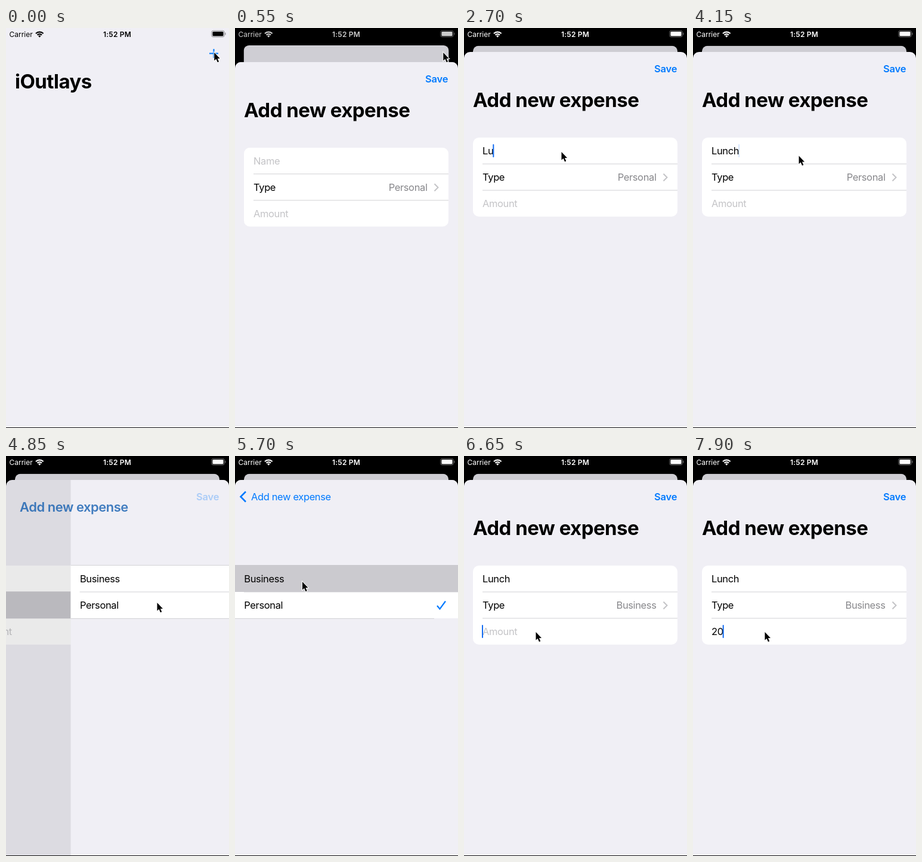
These frames come from a looping animation (374 px wide and 668 px high, 8 s). An HTML page with a canvas:

```html
<!DOCTYPE html>
<html lang="en">
<head>
<meta charset="utf-8">
<title>Expense form</title>
<style>
  html, body { margin: 0; width: 100%; height: 100%; overflow: hidden; background: #000; }
  canvas { display: block; width: 374px; height: 668px; }
</style>
</head>
<body>
<canvas id="stage"></canvas>
<script>
const W = 374, H = 668, LOOP = 8000;
const BLUE = '#007aff', PAGE = '#f0eff5', LINE = '#d2d2d5', FAINT = '#c4c4c7', GREY = '#88888c', PRESSED = '#cbcacf';
const TEXT_TRACKING = -0.023, TITLE_TRACKING = -0.016;
const canvas = document.getElementById('stage');
const ctx = canvas.getContext('2d');
const ratio = window.devicePixelRatio || 1;
canvas.width = W * ratio;
canvas.height = H * ratio;

const clamp = v => Math.max(0, Math.min(1, v));
const lerp = (a, b, k) => a + (b - a) * k;
const ramp = (t, from, to) => clamp((t - from) / (to - from));
const smooth = k => k * k * (3 - 2 * k);

// Remaining distance of a critically damped spring, 1 falling to 0
const spring = ms => {
  const x = Math.max(0, ms) * 0.0142;
  return (1 + x) * Math.exp(-x);
};

// [time, x, y] of the pointer tip
const POINTER = [
  [0, 349.3, 41], [600, 349.3, 41], [1000, 193, 186], [1150, 187, 216], [1300, 158, 208], [1450, 163.5, 207],
  [3900, 163.5, 207], [4100, 174, 212], [4500, 253.5, 245], [4900, 253.5, 245], [5500, 113, 210],
  [5800, 113, 210], [6000, 118.5, 247], [6400, 120.5, 294], [LOOP, 120.5, 294]
];

const NAME_KEYS = [2550, 2700, 3050, 3150, 3300];
const AMOUNT_KEYS = [7450, 7600];
const typed = (text, keys, t) => text.slice(0, keys.filter(key => t >= key).length);

function caretAlpha(t, starts) {
  const start = starts.filter(s => t >= s).pop();
  if (start === undefined) return 0;
  const phase = (t - start) % 1000;
  return 1 - ramp(phase, 420, 550) + ramp(phase, 680, 800);
}

// 0 on the form, 1 on the picker
function pushAt(t, lag = 0) {
  if (t >= 5850) return spring(t - lag - 5756);
  return t >= 4750 ? 1 - spring(t - lag - 4676) : 0;
}

function withState(draw) {
  ctx.save();
  draw();
  ctx.restore();
}

function rect(x, y, w, h, color) {
  ctx.fillStyle = color;
  ctx.fillRect(x, y, w, h);
}

function roundedPath(x, y, w, h, r) {
  ctx.beginPath();
  ctx.roundRect(x, y, w, h, r);
}

function polyline(points, color, width) {
  ctx.beginPath();
  points.forEach(([x, y]) => ctx.lineTo(x, y));
  ctx.strokeStyle = color;
  ctx.lineWidth = width;
  ctx.stroke();
}

function label(text, x, y, { size = 16.5, weight = 400, color = '#000', align = 'left', tracking = TEXT_TRACKING } = {}) {
  ctx.font = `${weight} ${size}px Inter, Roboto, sans-serif`;
  ctx.letterSpacing = `${size * tracking}px`;
  ctx.textAlign = align;
  ctx.fillStyle = color;
  ctx.fillText(text, x, y);
  return ctx.measureText(text).width;
}

function home(t) {
  rect(0, 0, W, H, PAGE);
  label('iOutlays', 15, 101, { size: 33, weight: 700, tracking: TITLE_TRACKING });
  withState(() => {
    ctx.globalAlpha = t >= 50 && t < 400 ? 0.3 : 1;
    polyline([[341, 42.5], [356, 42.5]], BLUE, 2);
    polyline([[348.5, 35], [348.5, 50]], BLUE, 2);
  });
}

function field(text, placeholder, baseline, caret) {
  const width = text ? label(text, 31, baseline) : 0;
  if (!text) label(placeholder, 31, baseline, { color: FAINT });
  withState(() => {
    ctx.globalAlpha = caret;
    ctx.fillStyle = '#126bf2';
    roundedPath(30 + width, baseline - 17, 2, 22, 1);
    ctx.fill();
  });
}

function form(t, highlight) {
  rect(-W, 40, W * 3, H, PAGE);
  withState(() => {
    roundedPath(15, 183, 343, 132, 10);
    ctx.clip();
    rect(15, 183, 343, 132, '#fff');
    rect(31, 226.5, 327, 1, LINE);
    rect(31, 270.5, 327, 1, LINE);
    ctx.globalAlpha = highlight;
    rect(15, 226.5, 343, 44.5, PRESSED);
  });
  const nameCaret = t < 6450 ? caretAlpha(t, [1600, ...NAME_KEYS, 3450, 5850]) : 0;
  field(typed('Lunch', NAME_KEYS, t), 'Name', 211, nameCaret);
  field(typed('20', AMOUNT_KEYS, t), 'Amount', 299, caretAlpha(t, [6650, ...AMOUNT_KEYS]));
  label('Type', 31, 255);
  label(t < 5850 ? 'Personal' : 'Business', 322.5, 255, { color: GREY, align: 'right' });
  polyline([[334.5, 243.5], [340.5, 249.5], [334.5, 255.5]], FAINT, 2);
}

function picker(t) {
  rect(0, 40, W, H, PAGE);
  rect(0, 182, W, 89, '#fff');
  rect(0, 182, W, 1, LINE);
  rect(15, 226.5, W, 1, LINE);
  rect(0, 271, 334, 1, LINE);
  if (t >= 5600 && t < 5900) rect(0, 182, W, 45, PRESSED);
  label('Business', 15.3, 211);
  label('Personal', 15.3, 255);
  polyline([[339, 250], [343.5, 255.5], [353, 242.5]], BLUE, 2.2);
}

function navigation(push, titlePush) {
  const shade = `rgba(0, ${122 * titlePush}, ${255 * titlePush}, ${1 - 1.2 * titlePush * (1 - titlePush)})`;
  label('Add new expense', lerp(15, 27, titlePush), lerp(132, 74, titlePush), {
    size: lerp(33, 16.5, titlePush),
    weight: Math.round(7 - 3 * titlePush ** 3) * 100,
    tracking: lerp(TITLE_TRACKING, TEXT_TRACKING, titlePush),
    color: shade
  });
  withState(() => {
    ctx.globalAlpha = 1 - push;
    label('Save', 357.3, 74, { weight: 600, color: BLUE, align: 'right', tracking: -0.01 });
    ctx.globalAlpha = ramp(push, 0.75, 1);
    polyline([[18, 59.5], [9.5, 68], [18, 76.5]], BLUE, 2.6);
  });
}

function sheet(t, drop) {
  const push = pushAt(t);
  const highlight = t < 4600 ? 0 : t < 5850 ? 1 : clamp(push * 1.4);

  ctx.translate(0, drop);
  roundedPath(0, 40, W, H, [10, 10, 0, 0]);
  ctx.clip();
  withState(() => {
    ctx.translate(-112 * push, 0);
    form(t, highlight);
  });
  if (push > 0) {
    rect(0, 40, W, H, `rgba(0, 0, 0, ${0.115 * push})`);
    withState(() => {
      ctx.translate(W * (1 - push), 0);
      picker(t);
    });
  }
  navigation(push, pushAt(t, 13));
}

function statusBar(t) {
  const tone = Math.round(255 * ramp(t, 200, 640));
  const color = `rgb(${tone}, ${tone}, ${tone})`;
  label('Carrier', 5.5, 14.5, { size: 12, color, tracking: 0 });
  label('1:52 PM', 186.5, 14.5, { size: 12, weight: 600, color, align: 'center', tracking: 0.015 });

  ctx.strokeStyle = ctx.fillStyle = color;
  ctx.lineWidth = 2.2;
  const from = -Math.PI * 0.75, to = -Math.PI * 0.25;
  for (const radius of [5.3, 8.9]) {
    ctx.beginPath();
    ctx.arc(56.3, 15.5, radius, from, to);
    ctx.stroke();
  }
  ctx.beginPath();
  ctx.moveTo(56.3, 15.8);
  ctx.arc(56.3, 15.5, 3, from, to);
  ctx.fill();

  roundedPath(346.4, 6, 18.2, 7.4, 1.5);
  ctx.fill();
  ctx.globalAlpha = 0.4;
  ctx.lineWidth = 1;
  roundedPath(344.8, 4.4, 21.4, 10.6, 2.8);
  ctx.stroke();
  rect(367.3, 7.8, 1.2, 3.8, color);
}

function pointer(t) {
  const next = Math.max(1, POINTER.findIndex(key => key[0] > t));
  const [t0, x0, y0] = POINTER[next - 1], [t1, x1, y1] = POINTER[next];
  const k = smooth(ramp(t, t0, t1));
  ctx.translate(lerp(x0, x1, k), lerp(y0, y1, k));
  ctx.beginPath();
  [[0, 0], [0, 13.5], [3.1, 10.8], [5.5, 16.3], [7.8, 15.3], [5.4, 10], [9.5, 10]]
    .forEach(([x, y]) => ctx.lineTo(x, y));
  ctx.closePath();
  ctx.strokeStyle = '#fff';
  ctx.lineWidth = 1.8;
  ctx.stroke();
  ctx.fillStyle = '#000';
  ctx.fill();
}

function draw(t) {
  ctx.setTransform(ratio, 0, 0, ratio, 0, 0);
  rect(0, 0, W, H, '#000');
  const shown = t < 200 ? 0 : 1 - spring(t - 164);
  withState(() => {
    ctx.translate(15 * shown, 29.7 * shown);
    ctx.scale(1 - 0.0825 * shown, 1 - 0.0825 * shown);
    roundedPath(0, 0, W, H, 10 * shown);
    ctx.clip();
    home(t);
    rect(0, 0, W, H, `rgba(0, 0, 0, ${0.14 * shown})`);
  });
  if (shown > 0) withState(() => sheet(t, (H - 40) * (1 - shown)));
  withState(() => statusBar(t));
  rect(0, H - 1, W, 1, '#111');
  withState(() => pointer(t));
}

const begin = performance.now();
function frame() {
  draw((performance.now() - begin) % LOOP);
  requestAnimationFrame(frame);
}
frame();
</script>
</body>
</html>
```
